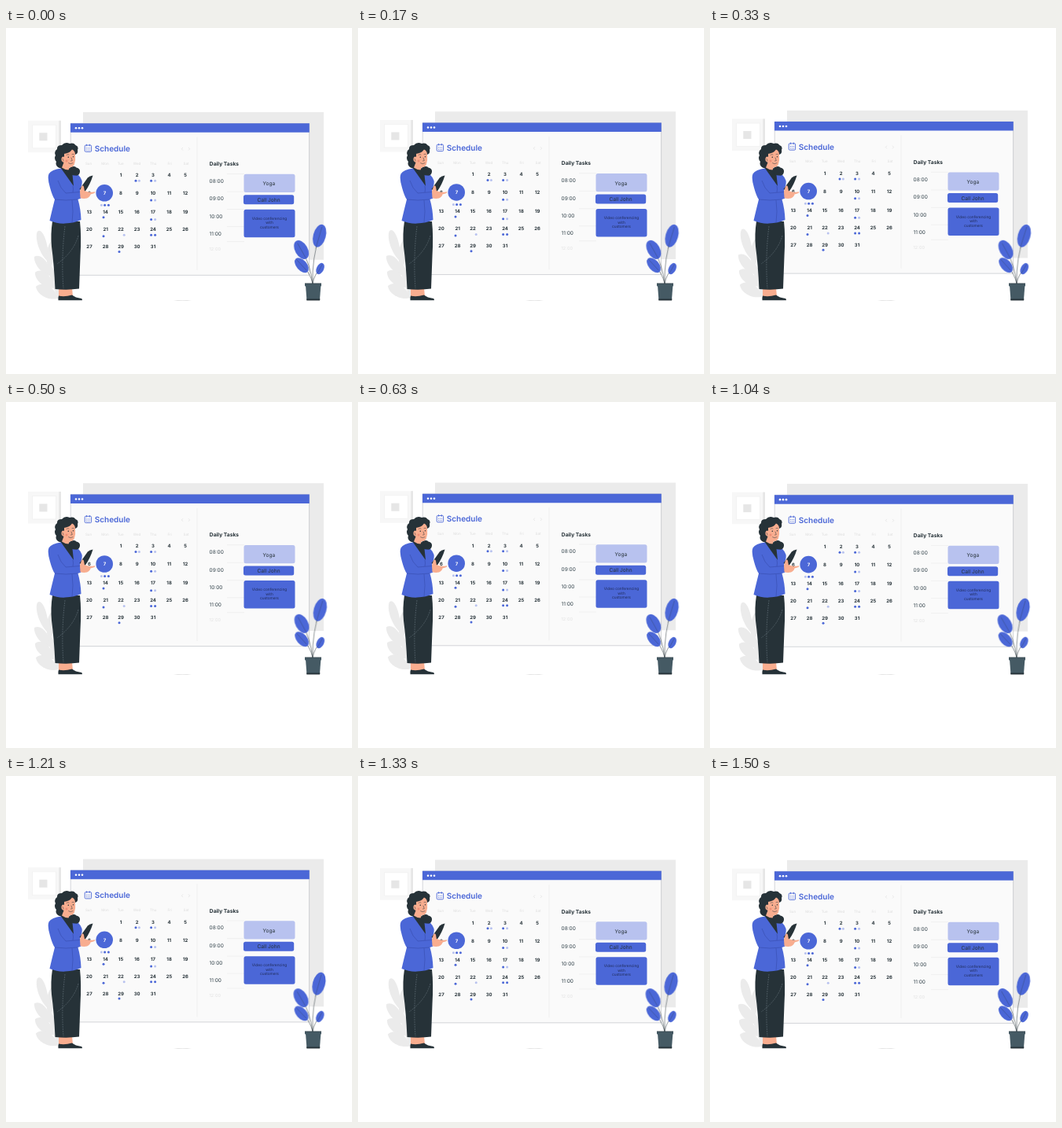
Recreate the animation shown at these times as an HTML page. Size 440 by 440 pixels, loop 1540 ms.

```html
<!DOCTYPE html>
<html lang="en">
<head>
<meta charset="utf-8">
<title>Schedule</title>
<style>
  html, body { margin: 0; width: 100%; height: 100%; overflow: hidden; background: #fff; }
  svg { display: block; width: 100vw; height: 100vh; }
  text { font-family: Inter, "Open Sans", sans-serif; text-rendering: geometricPrecision; }
  .float, .sway { animation: float 770ms cubic-bezier(.364, 0, .636, 1) -38ms infinite alternate; }
  .sway { animation-name: sway; animation-delay: -370ms; transform-origin: 390px 325px; }
  @keyframes float { from { transform: translateY(-.2px); } to { transform: translateY(-5px); } }
  @keyframes sway { from { transform: rotate(-.8deg); } to { transform: rotate(.6deg); } }
  .blue { fill: #4b67d7; }
  .pale { fill: #b8c2ef; }
  .dark { fill: #263238; }
  .skin { fill: #f8ad8f; }
  .mid { text-anchor: middle; }
  .day { font-size: 6px; font-weight: 700; fill: #263238; }
  .week { font-size: 4.5px; fill: #dcdcdc; }
  .hour { font-size: 6.5px; fill: #37474f; }
  .task { font-size: 6.6px; fill: #263238; }
  .note { font-size: 4.8px; fill: #202c58; }
  .line { fill: none; stroke: #263238; stroke-width: .5; stroke-linecap: round; }
</style>
</head>
<body>
<svg viewBox="0 0 440 440">
  <g class="float">
    <path fill="#ebebeb" d="M98 107.3H404V295H98Z"/>
    <g>
      <path fill="#f7f7f7" d="M28 118H70V158.5H28Z"/>
      <path fill="#e6e6e6" d="M67.3 118H70V158.5H67.3Z"/>
      <path fill="#fff" stroke="#ececec" stroke-width=".6" d="M33.5 123.5H63.5V153H33.5Z"/>
      <path fill="#e6e6e6" d="M42.3 133.5H52.5V143.5H42.3Z"/>
    </g>
    <g fill="#ebebeb">
      <path d="M54 298C42 288 36 266 40 259C46 253 55 274 54 298Z"/>
      <path d="M55 308C48 292 53 275 58 271C64 276 64 294 55 308Z"/>
      <path d="M58 316C46 314 35 301 36 291C45 286 56 299 58 316Z"/>
      <path d="M62 331C48 332 36 320 37 311C46 304 58 314 62 331Z"/>
      <path d="M67 344C54 348 39 339 38 329C47 321 62 330 67 344Z"/>
      <path d="M67 344Q54 322 52 290Q60 310 70 320Z"/>
    </g>

    <path fill="#fafafa" stroke="#a9adb5" stroke-width=".5" d="M82.2 121.7H385.6V314.6H82.2Z"/>
    <path class="blue" d="M82 121.5H385.8V133H82Z"/>
    <g fill="#fff">
      <circle cx="89" cy="127.5" r="1.3"/><circle cx="93" cy="127.5" r="1.3"/><circle cx="97" cy="127.5" r="1.3"/>
    </g>
    <path stroke="#e9e9e9" stroke-width=".6" d="M243 139V308"/>

    <g fill="none" stroke="#4b67d7" stroke-width=".9">
      <rect x="100.2" y="149.3" width="8.4" height="8.3" rx="1.2"/>
      <path d="M102.4 148V150.5M106.4 148V150.5"/>
      <path stroke-dasharray="1 1" d="M102 153H107.2M102 155.4H107.2"/>
    </g>
    <text class="blue" x="112.7" y="157.1" font-size="10" font-weight="600">Schedule</text>
    <path fill="none" stroke="#dcdcdc" stroke-width=".6" d="M225 152.2L223.3 154L225 155.8M232 152.2L233.7 154L232 155.8"/>
    <circle class="blue" cx="125.2" cy="210" r="10.8"/>
    <g id="days"></g>

    <text class="dark" x="258.8" y="175.5" font-size="6.7" font-weight="700">Daily Tasks</text>
    <g id="hours"></g>
    <rect class="pale" x="302.5" y="186" width="65" height="23.3" rx="2.5"/>
    <rect class="blue" x="302" y="212.5" width="64.2" height="12" rx="2.5"/>
    <rect class="blue" x="302.5" y="231" width="65" height="35.5" rx="2.5"/>
    <g class="mid">
      <text class="task" x="334.3" y="200.6">Yoga</text>
      <text class="task" x="334" y="221.1">Call John</text>
      <text class="note" x="335" y="244.2">Video conferencing</text>
      <text class="note" x="335" y="249.6">with</text>
      <text class="note" x="335" y="255">customers</text>
    </g>
  </g>

  <path fill="#b4b4b4" d="M213 346.3Q224 347.4 236 346.3Q224 346.5 213 346.3Z"/>

  <g class="sway">
    <path class="line" d="M390 325Q389 292 399 264M390 325Q387 300 376 282M390 325Q387 311 376 301M390 325Q392 313 400 306"/>
    <g class="blue">
      <ellipse cx="398.8" cy="264.2" rx="8" ry="14.8" transform="rotate(15 398.8 264.2)"/>
      <ellipse cx="375.7" cy="282" rx="8" ry="12.9" transform="rotate(-30 375.7 282)"/>
      <ellipse cx="376" cy="301.7" rx="6.6" ry="11.2" transform="rotate(-41 376 301.7)"/>
      <ellipse cx="399.6" cy="306" rx="4.6" ry="7.6" transform="rotate(26 399.6 306)"/>
    </g>
    <path class="line" stroke-opacity=".6" d="M394 280L402 253M381 292L371 274M382 308L370 295M396 312L402 301"/>
  </g>
  <path fill="#455a64" d="M381 327H400.4L399 345.5H382.4Z"/>
  <path fill="#37474f" d="M380 324.5H401V326H380Z"/>
  <path fill="#455a64" d="M380 325.4H401V328.3H380Z"/>
  <path class="dark" d="M382 344.5H399.5L399 346.6H382.4Z"/>

  <g>
    <path class="skin" d="M67 330H84L85 342H67Z"/>
    <path class="dark" d="M67 340.5Q74 342.5 84 339.5Q88 343 96 344Q97.4 345 96.8 346.3H66.5Q66 343 67 340.5Z"/>
    <path class="dark" d="M59 246H94Q96 264 94.5 290L93 331.5Q79 333.5 62.5 332Q61 300 58 278Q56.5 262 59 246Z"/>
    <path fill="none" stroke="#78878f" stroke-width=".45" stroke-dasharray="2 1" d="M92 264Q86 285 65 300M75 252Q70 292 73 331"/>
    <path class="dark" d="M69 177Q78 176 87 181L92 200L82 214Z"/>
    <path class="blue" d="M70 178.5Q58 180 54.5 185.5Q52.3 191 56 203Q59 214 62 218Q58 234 55.5 245Q65 249 75 248.6Q87 248 95.5 244Q95 230 91.5 218L95.5 216.5L94.5 208L94 207Q97.5 198 96.5 194Q94 186 84 182L86 201Z"/>
    <path fill="none" stroke="#3247a5" stroke-width=".5" d="M66 194Q69 204 76 210L94 208.5M62 218Q76 220 91 218M85 201Q86 205 85 209M84 219Q86 233 84 248"/>
    <path class="dark" d="M93.5 205L104 190.3Q107 188 110.5 187.4Q107 199 100.5 208Z"/>
    <path class="skin" d="M94 207.5Q98 206 102 207.8Q106 209.5 113 208.2Q114 209.3 111 210.6L107.5 211.5Q107 214.5 103 216.5Q98 217.5 94.5 216Z"/>
    <path class="skin" d="M94 208L96 201.5Q98 199.5 99 202L100 208Z"/>

    <path class="dark" d="M68 178Q62 175 64 170Q60.5 166 63 162Q60.5 157 65 154Q64.5 149 71 149Q75 144.5 81 147Q86 145.5 88.5 149Q93 151 91 155Q92 160 88 161L80 178Z"/>
    <path class="dark" d="M82 177Q87 175 89.5 177.5Q94.5 178.5 94 183Q93 188.5 88 187.5Q83 188 79 182Z"/>
    <path class="skin" d="M74 160Q81 159 84 154.5Q88 156 88 161Q88.7 168 87 173Q85.5 177.5 81 177L79.5 180.5Q75 180.5 71 177.5L73.5 171Q70 170 70.5 165.5Q72 162.5 74 164Z"/>
    <path class="line" d="M77 161.5Q78.5 160 80 161M84 160.5Q85.5 159.8 86.5 160.8M83 165L84.3 168.6L82.5 169M79.5 171.8Q82 174 85 171.8M71.8 166Q73 166.5 73 169"/>
    <circle class="dark" cx="79.3" cy="164.3" r=".8"/><circle class="dark" cx="85.5" cy="163.7" r=".7"/>
    <circle fill="#ee8f76" cx="77" cy="169" r="1.5"/>
  </g>
</svg>
<script>
  const cols = [106, 126.6, 146, 166.6, 187, 207.6, 228.2];
  const rows = [187, 210.1, 234, 256, 278];
  const label = (x, y, cls, s, more = "") => `<text x="${x}" y="${y}" class="${cls}" ${more}>${s}</text>`;
  const dot = ([x, y, pale]) => `<circle cx="${x}" cy="${y}" r="1.5" class="${pale ? "pale" : "blue"}"/>`;

  let days = "";
  ["Sun", "Mon", "Tue", "Wed", "Thu", "Fri", "Sat"].forEach((d, i) => {
    days += label(cols[i] - 1 + i * .3, 173.8, "week mid", d);
  });
  for (let n = 1; n <= 31; n++) {
    const cell = n + 1;
    const x = n === 7 ? 125.4 : cols[cell % 7];
    days += label(x, rows[Math.floor(cell / 7)] + 2.4, "day mid", n, n === 7 ? 'style="fill:#fff"' : "");
  }
  // x, y, pale
  const dots = [
    [165, 194.5], [169.4, 194.5, 1], [184.6, 194.5], [189.6, 194.5, 1],
    [121.4, 225.6, 1], [125.6, 225.6], [130.4, 225.6], [184.6, 219.3], [189.6, 219.3, 1],
    [124, 241], [184.6, 243.8], [189.6, 243.8, 1],
    [124, 265], [150.2, 263.5, 1], [184.6, 263.5], [189.6, 263.5], [144, 284.7]
  ];
  document.getElementById("days").innerHTML = days + dots.map(dot).join("");

  const hourY = [194.8, 217.4, 239.8, 261.8, 280.8];
  document.getElementById("hours").innerHTML = hourY.map((y, i) => {
    const last = i === 4;
    const text = label(258.6, y + 2.3, "hour", String(8 + i).padStart(2, "0") + ":00", last ? 'style="fill:#e2e2e2;font-size:5.6px"' : "");
    return text + `<path stroke="#e4e4e4" stroke-width=".5" d="M281 ${y - 9}H303"/>`;
  }).join("");
</script>
</body>
</html>
```
